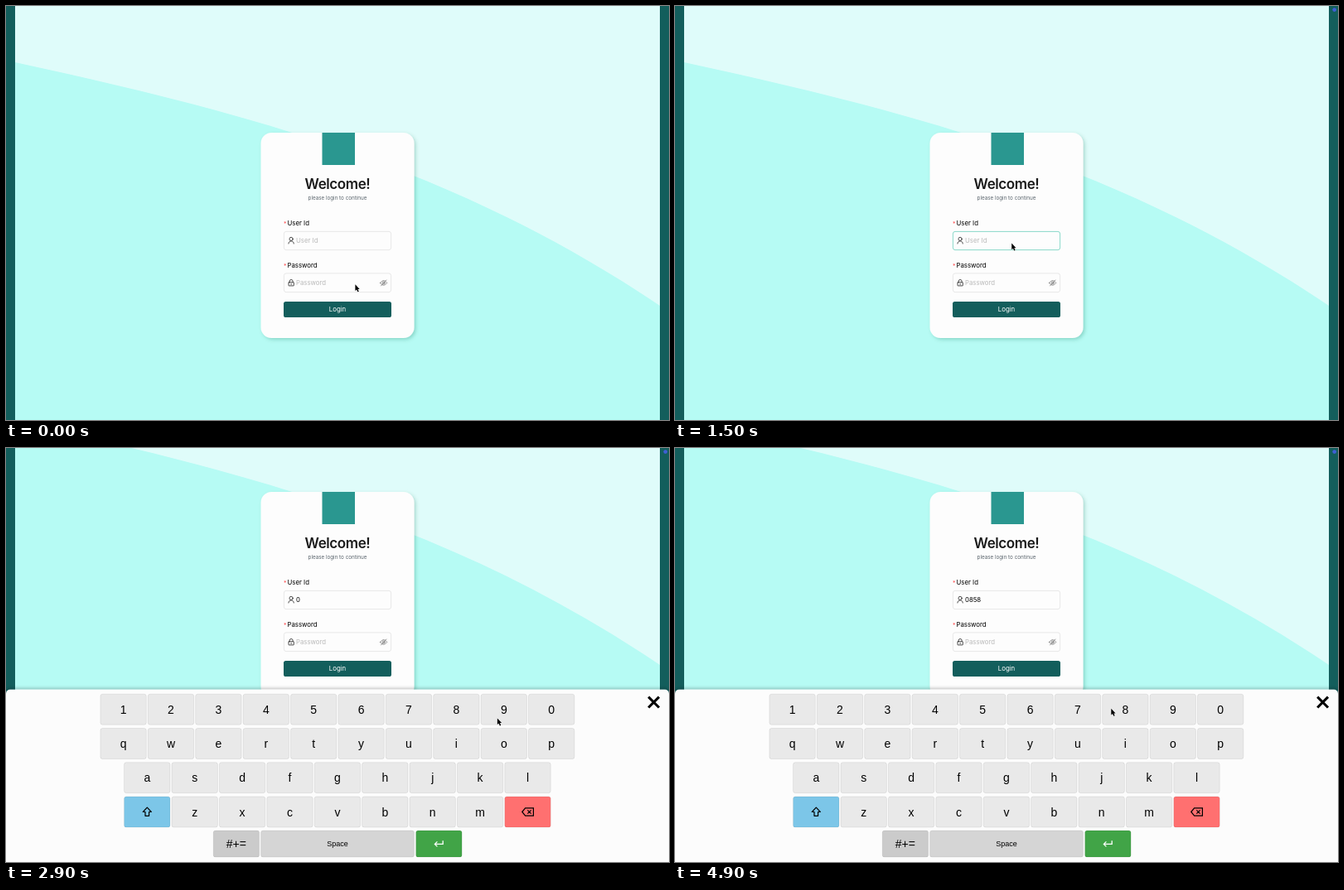
These frames come from a looping animation (800x500 px, 5 s). An HTML page:

```html
<!DOCTYPE html>
<html lang="en">
<head>
<meta charset="utf-8">
<title>Login keyboard</title>
<style>
  html, body { margin: 0; width: 100%; height: 100%; overflow: hidden; background: #b6fbf4; }
  svg { display: block; width: 800px; height: 500px; }
  text { font-family: Inter, Roboto, sans-serif; font-size: 7.8px; }
  .mid { text-anchor: middle; }
  .title { font-size: 17px; font-weight: 600; letter-spacing: -.4px; fill: #1a1a1a; }
  .sub { font-size: 6.3px; fill: #59636b; }
  .hint { fill: #b9b9b9; }
  .star { font-size: 7px; fill: #ff4d4f; }
  .box { fill: #fdfdfd; stroke: #e2e2e2; stroke-width: .8; }
  .icon { fill: none; stroke: #222; stroke-width: .8; stroke-linecap: round; }
  .key text { font-family: "Liberation Sans", Arial, sans-serif; font-size: 14px; text-anchor: middle; }
  .key rect { stroke: #000; stroke-opacity: .1; stroke-width: .7; }
</style>
</head>
<body>
<svg viewBox="0 0 800 500">
  <defs>
    <filter id="soft" x="-10%" y="-10%" width="120%" height="120%">
      <feDropShadow dx="2" dy="2" stdDeviation="2.2" flood-color="#064" flood-opacity=".25"/>
    </filter>
    <filter id="lift" x="-2%" y="-5%" width="104%" height="110%">
      <feDropShadow dx="0" dy="-1" stdDeviation="2" flood-color="#000" flood-opacity=".32"/>
    </filter>
  </defs>
  <rect width="800" height="500" fill="#dffcfa"/>
  <g id="page">
    <path d="M11 68C270.3 125 529.7 187 789 362V620H11Z" fill="#b6fbf4"/>
    <rect x="307.5" y="153" width="185" height="248" rx="13" fill="#fdfdfd" filter="url(#soft)"/>
    <rect x="381.5" y="153" width="39.5" height="39" fill="#2a9790"/>
    <text class="mid title" x="400" y="221.3">Welcome!</text>
    <text class="mid sub" x="400" y="233.6">please login to continue</text>

    <text class="star" x="335" y="265.5">*</text>
    <text x="339.5" y="264.8">User Id</text>
    <rect id="glow" x="334.3" y="271.3" width="131.4" height="24.4" rx="3.2" fill="none" stroke="#5fcf9a" stroke-opacity=".3" stroke-width="1.6"/>
    <rect id="field" class="box" x="335.4" y="272.4" width="129.2" height="22.2" rx="2.6"/>
    <g class="icon">
      <circle cx="344.1" cy="281.4" r="2.1"/>
      <path d="M340.9 287C341 282.7 347.2 282.7 347.3 287"/>
    </g>
    <text id="value" x="350" y="286.3"></text>
    <rect id="caret" x="350.2" y="278.5" width=".9" height="9.6"/>

    <text class="star" x="335" y="316.5">*</text>
    <text x="339.5" y="315.8">Password</text>
    <rect class="box" x="335.4" y="322.9" width="129.2" height="22.7" rx="2.6"/>
    <g class="icon">
      <rect x="341" y="333.7" width="6.3" height="4.2" rx=".4"/>
      <path d="M342.2 333.5V332.3Q342.2 330.5 344.1 330.5T346.1 332.3V333.5M344.1 335.3V336.4"/>
    </g>
    <text class="hint" x="350" y="337.3">Password</text>
    <g class="icon" style="stroke:#777">
      <path d="M451.6 334.4Q455.6 328.6 459.8 334.4Q455.6 340.2 451.6 334.4ZM452.6 337.9L458.9 331"/>
      <circle cx="455.7" cy="334.4" r="1.4"/>
    </g>
    <rect x="335" y="357" width="130" height="19" rx="2.6" fill="#135e5c"/>
    <text class="mid" x="400" y="369.4" fill="#fff">Login</text>
  </g>
  <rect width="11" height="500" fill="#135e5c"/>
  <rect x="789" width="11" height="500" fill="#135e5c"/>
  <circle id="dot" cx="795.7" cy="4.6" r="2.4" fill="#3f5fd6"/>
  <g id="board">
    <rect y="291.7" width="800" height="220" rx="5" fill="#fcfcfc" filter="url(#lift)"/>
    <path d="M775.2 300.7L788 313.5M788 300.7L775.2 313.5" stroke="#000" stroke-width="3.1"/>
    <g id="keys"></g>
    <path d="M170.3 434.2L165.3 439.5H168V444.3H172.6V439.5H175.3Z" fill="none" stroke="#000" stroke-width="1.2" stroke-linejoin="round"/>
    <path d="M622.8 439.5L626.6 434.9H636.4V444.1H626.6ZM629.3 437.3L633.7 441.7M633.7 437.3L629.3 441.7" fill="none" stroke="#000" stroke-width="1.2"/>
    <path d="M527.2 474.2V478.4H517.6M520.4 475.4L517.4 478.4L520.4 481.4" fill="none" stroke="#fff" stroke-width="1.3"/>
  </g>
  <path id="pointer" d="M0 0V7.6L1.7 6.1L3 9L4.4 8.4L3.1 5.6H5.3Z" stroke="#fff" stroke-width=".6" stroke-opacity=".8" paint-order="stroke"/>
</svg>
<script>
const $ = id => document.getElementById(id);
const LOOP = 5000, STEP = 100, PITCH = 57.4;

// keyboard
const key = (x, y, w, h, label, fill = '#e9e9e9', size = 14) =>
  `<g class="key"><rect x="${x}" y="${y}" width="${w}" height="${h}" rx="2.6" fill="${fill}"/>` +
  `<text x="${x + w / 2}" y="${y + h / 2 + size * .36}" style="font-size:${size}px">${label}</text></g>`;
const row = (chars, x, y) => [...chars].map((c, i) => key(x + i * PITCH, y, 55.4, 37, c)).join('');
$('keys').innerHTML =
  row('1234567890', 113.9, 297.2) +
  row('qwertyuiop', 113.9, 338.5) +
  row('asdfghjkl', 142.6, 379.7) +
  row('zxcvbnm', 142.6 + PITCH, 421) +
  key(142.6, 421, 55.4, 37, '', '#7cc6e8') +
  key(142.6 + 8 * PITCH, 421, 55.4, 37, '', '#ff7070') +
  key(250.2, 462, 55.4, 32, '#+=', '#cbcbcb') +
  key(307.6, 462, 184.8, 32, 'Space', '#d5d5d5', 9) +
  key(494.7, 462, 55.4, 32, '', '#41a447');

// pointer stops: time, x, y
const stops = [
  [300, 421.4, 336.3], [600, 406.2, 293.5], [900, 406.2, 293.5], [1200, 406.2, 286.6],
  [1900, 406.2, 286.6], [2400, 644.7, 326], [2700, 644.7, 326], [3100, 541, 327],
  [3300, 541, 327], [3500, 456.2, 329.5], [3800, 388, 323], [3900, 386, 322.5],
  [4200, 386, 322.5], [4500, 541, 320.5], [4600, 541, 320.5], [4900, 526.3, 314.8]
];
const ease = p => p * p * (3 - 2 * p);

function pointerAt(t) {
  const i = stops.findIndex(s => s[0] > t);
  if (i === 0) return stops[0].slice(1);
  if (i < 0) return stops[stops.length - 1].slice(1);
  const [t0, x0, y0] = stops[i - 1], [t1, x1, y1] = stops[i];
  const p = ease((t - t0) / (t1 - t0));
  return [x0 + (x1 - x0) * p, y0 + (y1 - y0) * p];
}

const strokes = [[2700, '0'], [3200, '8'], [4300, '5'], [4700, '8']];
const show = (id, on) => $(id).setAttribute('visibility', on ? 'visible' : 'hidden');

function draw(t) {
  const open = t >= 1600, focus = open && t < 2700, hover = t >= 600 && !open;
  const typed = strokes.filter(s => t >= s[0]).map(s => s[1]).join('');
  $('page').setAttribute('transform', `translate(0 ${open ? -100 : 0})`);
  show('board', open);
  show('dot', t >= 300);
  show('glow', focus);
  show('caret', focus && t < 2100);
  $('field').style.stroke = focus ? '#67caa3' : hover ? '#6ed0bd' : '';
  $('value').textContent = typed || 'User Id';
  $('value').setAttribute('class', typed ? '' : 'hint');
  $('pointer').setAttribute('transform', `translate(${pointerAt(t)})`);
}

const start = performance.now();
function tick() {
  const t = (performance.now() - start) % LOOP;
  draw(Math.floor(t / STEP) * STEP);
  requestAnimationFrame(tick);
}
draw(0);
requestAnimationFrame(tick);
</script>
</body>
</html>
```
